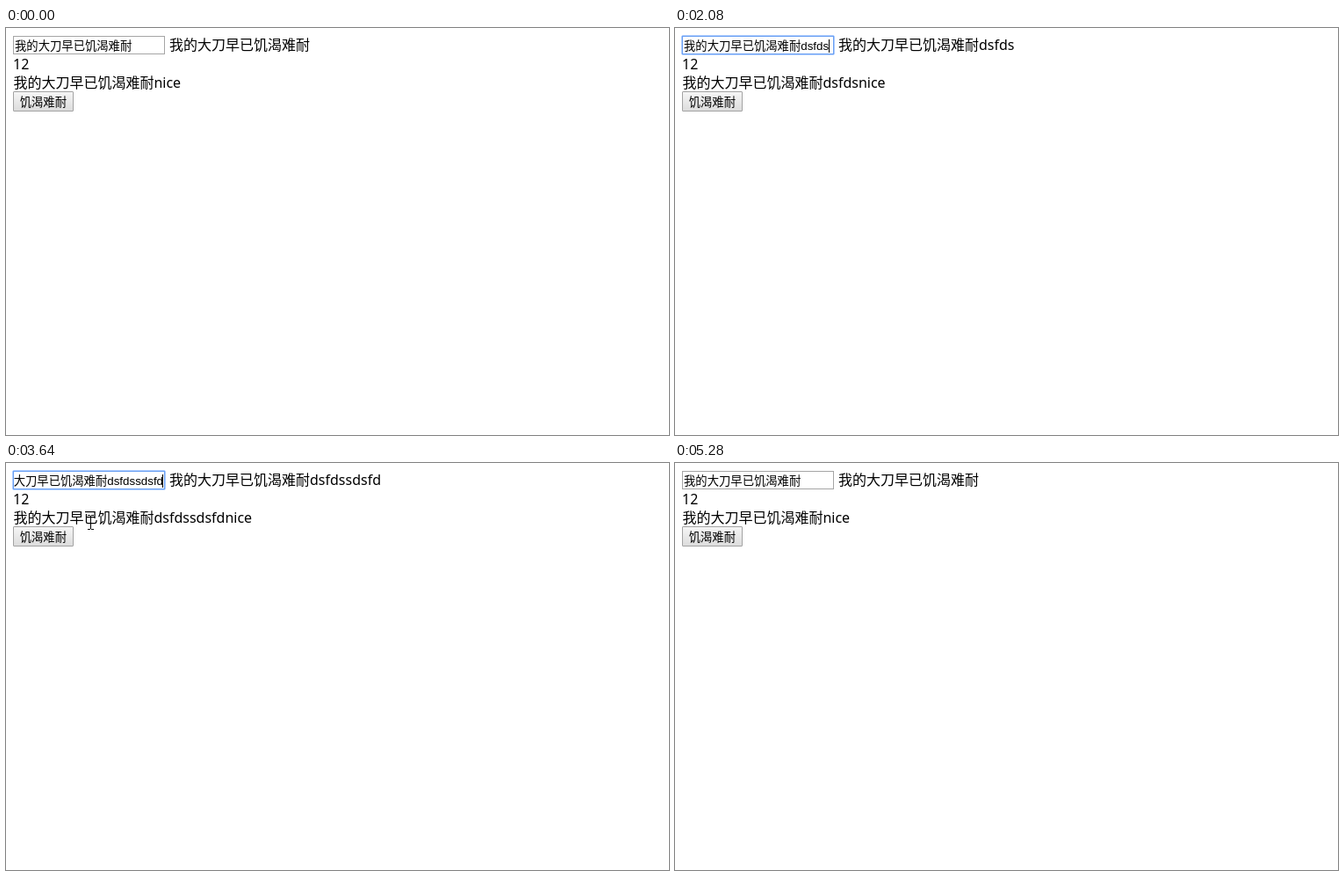
Animation of 755x463 px, one loop 6020 ms. Source, as an HTML page:

```html
<!DOCTYPE html>
<html lang="zh">
<head>
<meta charset="utf-8">
<style>
html, body { margin: 0; width: 100%; height: 100%; overflow: hidden; background: #fff; }
svg { display: block; }
text { white-space: pre; }
.page { font: 16px "Noto Sans", "Noto Sans CJK SC", sans-serif; }
.form { font: 13.333px "Liberation Sans", "Noto Sans CJK SC", sans-serif; }
.pinyin { font: bold 16px "Liberation Sans", sans-serif; fill: #0a5fc4; }
.word { font: 300 16px "Noto Sans CJK SC", sans-serif; }
.num { font: 300 13.333px "Noto Sans Mono", monospace; }
.hidden { display: none; }
</style>
</head>
<body>
<svg width="755" height="463" viewBox="0 0 755 463">
  <defs>
    <linearGradient id="up" x2="0" y2="1"><stop stop-color="#f6f6f6"/><stop offset="1" stop-color="#dcdcdc"/></linearGradient>
    <linearGradient id="over" x2="0" y2="1"><stop stop-color="#f9f9f9"/><stop offset="1" stop-color="#e2e2e2"/></linearGradient>
    <linearGradient id="down" x2="0" y2="1"><stop stop-color="#dedede"/><stop offset="1" stop-color="#f4f4f4"/></linearGradient>
    <clipPath id="field"><rect x="9" y="10" width="170.5" height="19"/></clipPath>
  </defs>

  <rect id="ring" x="7.5" y="8.5" width="174" height="22" rx="1.5" fill="none" stroke="#4d90fe" stroke-opacity=".45"/>
  <rect id="box" x="8.5" y="9.5" width="172" height="20" fill="#fff"/>
  <g clip-path="url(#field)">
    <text id="value" class="form" y="25"></text>
    <rect id="underline" x="143" y="27" height="1"/>
    <rect id="caret" y="13" width="1" height="15"/>
  </g>
  <text id="label" class="page" x="186" y="25"></text>
  <text class="page" x="8" y="47">12</text>
  <text id="line" class="page" x="8.400" y="68"></text>
  <rect id="button" x="8.5" y="72.5" width="68" height="22" rx=".5" stroke="#a3a3a3"/>
  <text class="form" x="15.7" y="89">饥渴难耐</text>

  <g id="panel">
    <rect id="frame" x="143.5" y="28.5" height="55" fill="#fff" stroke="#b3b6bf"/>
    <path id="rule" stroke="#dcdcdc"/>
    <text id="pinyin" class="pinyin" x="154" y="48"></text>
    <rect id="mark" y="33" width="1" height="19" fill="#f00"/>
    <g id="words"></g>
    <g id="side">
      <rect x="-31" y="29" width="30" height="30" fill="#fca988"/>
      <g fill="none" stroke-width="2">
        <path d="M-46 65.500l-4.500 4 4.500 4" stroke="#d8d8d8"/>
        <path d="M-35.500 65.500l4.500 4-4.500 4M-20 67.500l4 4 4-4" stroke="#e4694a"/>
      </g>
    </g>
  </g>

  <circle id="glow" r="12" fill="#ff0" fill-opacity=".6"/>
  <path id="beam" d="M-3.500 -8h3M.5 -8h3M0 -7.500v15M-3.500 8h3M.5 8h3" fill="none" stroke="#000"/>
  <path id="arrow" d="M.5 .5v16l3.700-3.600 2.700 5.900 2.200-1-2.700-5.500h5.300z" fill="#fff" stroke="#000"/>
</svg>
<script>
const LOOP = 6020;
const BASE = '我的大刀早已饥渴难耐';
const LEFT = 10, RIGHT = 179;
const $ = id => document.getElementById(id);
const show = (id, on) => $(id).classList.toggle('hidden', !on);
const set = (id, attrs) => {
  for (const k in attrs) $(id).setAttribute(k, attrs[k]);
};
const within = (t, a, b) => t >= a && t < b;
const at = (steps, t) => steps.reduce((v, s) => t >= s[0] ? s[1] : v, '');

const typed = [
  [1470, 'd'], [1550, 'ds'], [1640, 'dsf'], [1830, 'dsfds'], [2660, 'dsfdss'],
  [3080, 'dsfdssd'], [3210, 'dsfdssds'], [3330, 'dsfdssdsf'], [3460, 'dsfdssdsfd'], [4320, '']
];
const candidates = [
  [1470, '的 大 都 到 等'],
  [1550, '大师 都是 的是 但是 电视'],
  [1640, '第三方 多少份 的算法 大沙发 都是饭'],
  [1830, '第三方的是 多少份都是 的算法都是 大沙发上 都是饭的'],
  [2080, '']
];

// [start, end, steps, from, to, easing power]
const moves = [
  [110, 470, 7, [640, 436], [125, 36], 2],
  [610, 720, 3, [135, 31], [157, 22], 1],
  [2460, 2460, 1, [157, 25], [157, 25], 1],
  [3520, 3640, 3, [148, 34], [96, 67], 1],
  [3710, 4000, 5, [90, 71], [64, 83], 1],
  [4700, 5280, 10, [70, 90], [720, 470], -2]
];

function pointer(t) {
  const m = moves.filter(m => t >= m[0]).pop();
  if (!m) return [800, 500];
  const [a, b, n, from, to, pow] = m;
  const k = n > 1 ? Math.min(n - 1, Math.floor((t - a) / (b - a) * (n - 1) + 1e-6)) / (n - 1) : 1;
  const e = pow > 0 ? 1 - (1 - k) ** pow : k ** -pow;
  return from.map((v, i) => Math.round(v + (to[i] - v) * e));
}

let listed = null;
function drawPanel(keys, list) {
  show('panel', list);
  if (list === listed) return;
  listed = list;
  if (!list) return;
  let x = 154;
  $('words').innerHTML = list.split(' ').map((word, i) => {
    const s = `<g fill="${i ? '#0a84dc' : '#f00000'}"><text class="num" x="${x}" y="75">${i + 1}.</text>` +
      `<text class="word" x="${x + 16}" y="75">${word}</text></g>`;
    x += 29 + 16 * word.length;
    return s;
  }).join('');
  const right = x + 56;
  set('frame', { width: right - 144 });
  set('rule', { d: `M154 55.5H${right - 32}` });
  set('side', { transform: `translate(${right})` });
  $('pinyin').textContent = [...keys].join("'");
  set('mark', { x: Math.round(154 + $('pinyin').getComputedTextLength()) });
}

function draw(t) {
  const keys = at(typed, t), text = BASE + keys, list = at(candidates, t);
  const focus = within(t, 980, 4160);
  $('value').textContent = text;
  $('label').textContent = text;
  $('line').textContent = text + 'nice';

  const end = LEFT + $('value').getComputedTextLength();
  const scroll = focus ? Math.max(0, end - RIGHT) : 0;
  const caret = Math.round(end - scroll - .6);
  set('value', { x: LEFT - scroll });
  set('caret', { x: caret });
  set('underline', { width: Math.max(0, caret - 143) });
  show('underline', list);
  show('caret', focus);
  show('ring', focus);
  set('box', { stroke: focus ? '#6a9ff2' : '#a5a5a5' });
  drawPanel(keys, list);

  const [x, y] = pointer(t);
  const hover = x < 77 && y >= 72 && y < 95;
  const state = within(t, 4160, 4320) ? 'down' : hover ? 'over' : 'up';
  set('button', { fill: `url(#${state})` });

  const visible = within(t, 110, 5280) && !within(t, 1040, 1290) && !within(t, 1830, 2460);
  const beam = within(t, 665, 3710);
  show('beam', visible && beam);
  show('arrow', visible && !beam);
  set('beam', { transform: `translate(${x + .5} ${y + .5})` });
  set('arrow', { transform: `translate(${x} ${y})` });
  show('glow', within(t, 860, 1040) || within(t, 4100, 4320));
  set('glow', { cx: x - (beam ? 1 : -1), cy: y - (beam ? 1 : 0) });
}

const start = performance.now();
function tick() {
  draw((performance.now() - start) % LOOP);
  requestAnimationFrame(tick);
}
tick();
</script>
</body>
</html>
```
